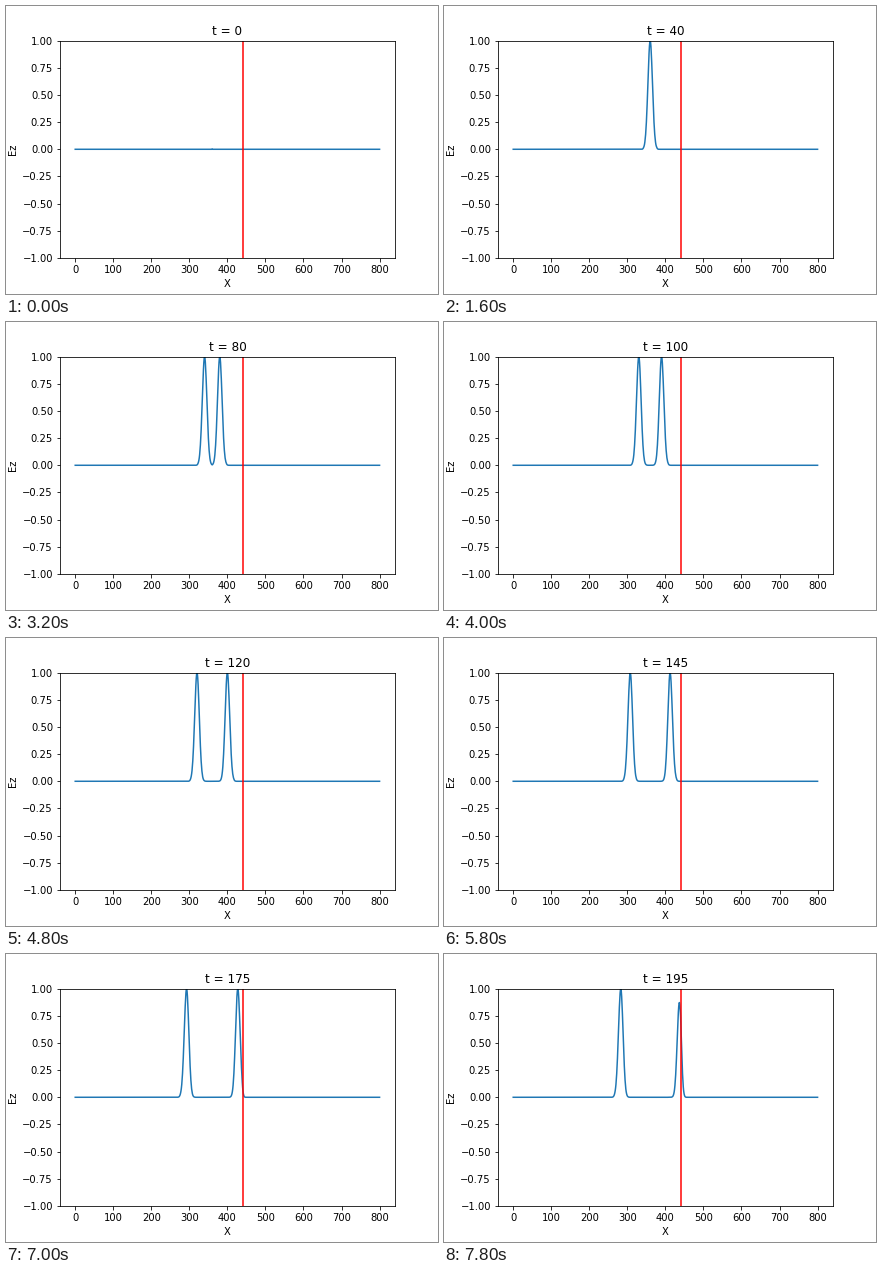
These frames come from a looping animation (432 px wide and 288 px high, 8000 ms). A matplotlib script:

```python
import numpy as np
import matplotlib.pyplot as plt
from matplotlib.animation import FuncAnimation

CELLS = 801
SOURCE = 360
WALL = 440
EPS = 2.0
T0, SPREAD = 40, 12
STRIDE = 5
FRAMES = 40


def simulate(last):
    """1D FDTD with a hard Gaussian source; returns Ez after every step."""
    ez = np.zeros(CELLS)
    hy = np.zeros(CELLS)
    coef = np.full(CELLS, 0.5)
    coef[WALL:] /= EPS
    history = []
    for t in range(last + 1):
        ez[1:] += coef[1:] * (hy[:-1] - hy[1:])
        ez[SOURCE] = np.exp(-0.5 * ((T0 - t) / SPREAD) ** 2)
        hy[:-1] += 0.5 * (ez[:-1] - ez[1:])
        history.append(ez.copy())
    return history


fields = simulate(STRIDE * (FRAMES - 1))

fig = plt.figure(figsize=(6, 4), dpi=72, facecolor="white")
fig.subplots_adjust(left=0.125, right=0.9, bottom=0.125, top=0.88)
ax = fig.add_subplot()
line, = ax.plot(np.arange(CELLS), fields[0])
ax.axvline(WALL, color="red")
ax.set_ylim(-1, 1)
ax.set_xlabel("X")
ax.set_ylabel("Ez")
title = ax.set_title("t = 0")


def update(frame):
    t = frame * STRIDE
    line.set_ydata(fields[t])
    title.set_text(f"t = {t}")
    return line, title


anim = FuncAnimation(fig, update, frames=FRAMES, interval=200,
                     repeat=True, repeat_delay=0, blit=False)
plt.show()
```
